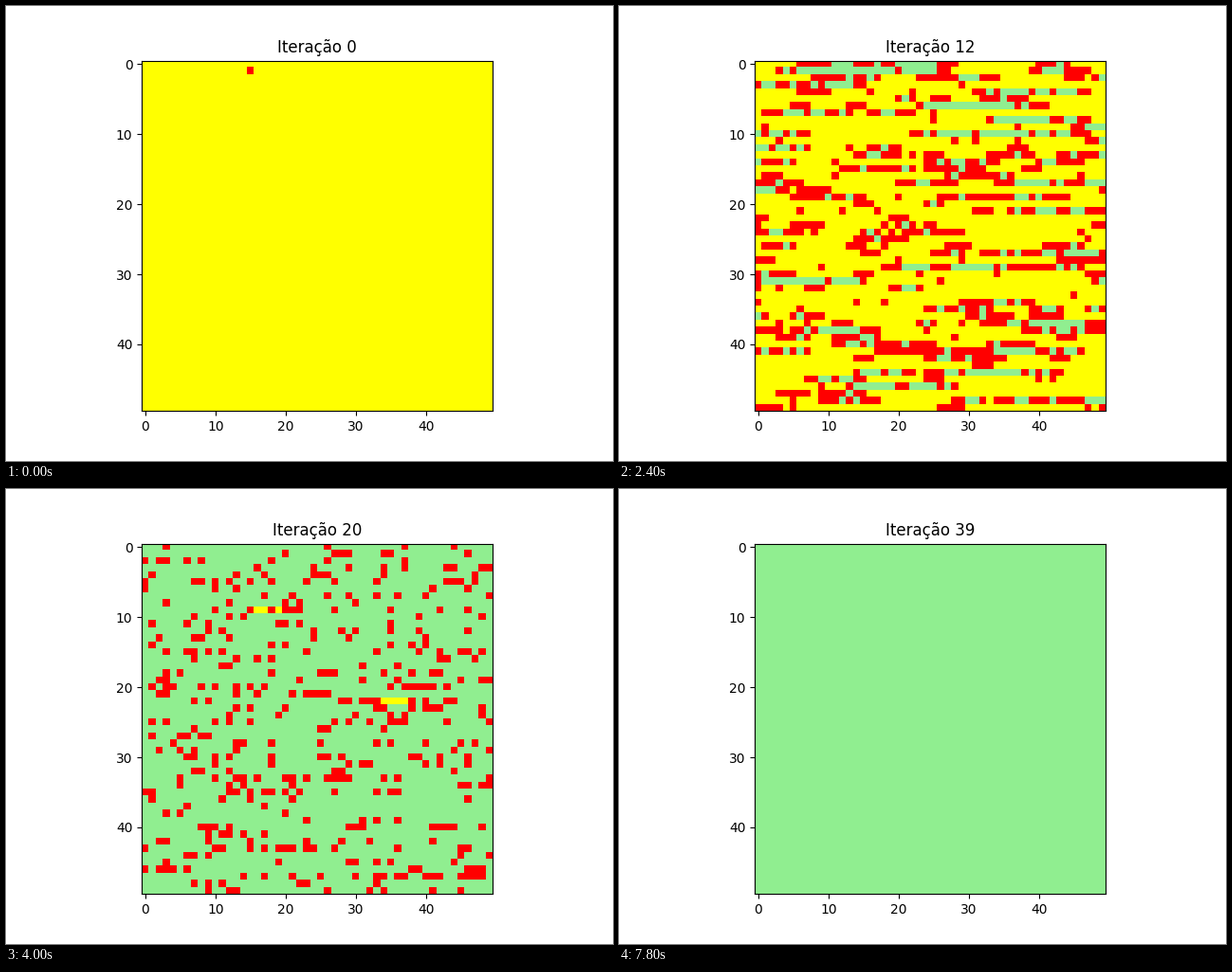
Animation, 640 px wide and 480 px high, one loop 8000 ms. Source, as a matplotlib script:

```python
import numpy as np
import matplotlib.pyplot as plt
from matplotlib.animation import FuncAnimation
from matplotlib.colors import ListedColormap

SIZE = 50
STEPS = 40
RECOVERY = 0.26     # chance per step that an infected cell recovers
JUMP = 0.2          # distant infections per infected cell and step
FIRST_JUMP = 4      # random jumps begin here
ALL_CLEAR = 36      # nobody is infected from this step on
NEVER = 999

# First outbreaks: (step, row, column)
OUTBREAKS = [(0, 1, 15), (1, 10, 34), (3, 6, 32), (3, 31, 6), (3, 37, 41)]


def infection_lengths(rng, count):
    """Geometric lengths at even quantiles, in random order."""
    left = (rng.permutation(count) + 0.5) / count
    return 1 + (np.log(left) / np.log(1 - RECOVERY)).astype(int)


def simulate(rng):
    """Return the step of infection and of recovery for every cell.

    The cells form one line, row after row; an infected cell infects both
    neighbours on that line and now and then a cell anywhere.
    """
    cells = SIZE * SIZE
    start = np.full(cells, NEVER)
    life = infection_lengths(rng, cells)
    for step in range(STEPS):
        red = (start < step) & (step - 1 < start + life)
        hit = np.roll(red, 1) | np.roll(red, -1)
        for when, row, col in OUTBREAKS:
            if when == step:
                hit[row * SIZE + col] = True
        if step >= FIRST_JUMP:
            hit[rng.integers(0, cells, round(JUMP * red.sum()))] = True
        start[hit & (start == NEVER)] = step
    end = np.minimum(start + life, ALL_CLEAR)
    return start.reshape(SIZE, SIZE), end.reshape(SIZE, SIZE)


start, end = simulate(np.random.default_rng(7))


def state(step):
    """0 healthy, 1 infected, 2 recovered."""
    return np.where(step < start, 0, np.where(step < end, 1, 2))


fig, ax = plt.subplots(figsize=(6.4, 4.8), dpi=100)
image = ax.imshow(state(0), vmin=0, vmax=2, interpolation="nearest",
                  cmap=ListedColormap(["yellow", "red", "lightgreen"]))
title = ax.set_title("Iteração 0")


def update(step):
    image.set_data(state(step))
    title.set_text(f"Iteração {step}")
    return image, title


anim = FuncAnimation(fig, update, frames=STEPS, interval=200, repeat=True,
                     repeat_delay=0)
plt.show()
```
